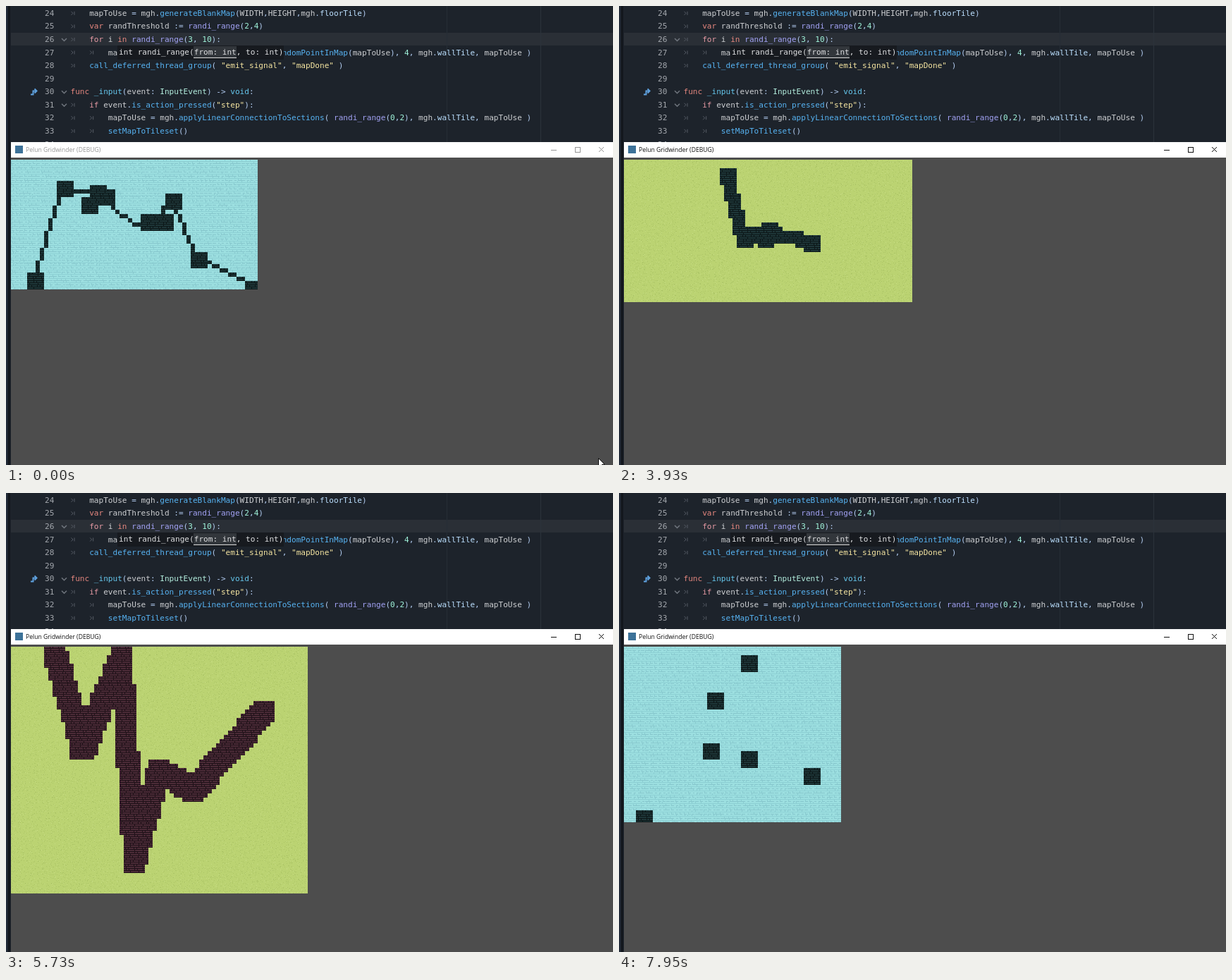
Recreate the animation shown at these times as an HTML page with a canvas. Size 861 px wide and 651 px high, loop 8000 ms.

```html
<!DOCTYPE html>
<html lang="en">
<head>
<meta charset="utf-8">
<title>Map generator</title>
<style>
html, body { margin: 0; width: 100%; height: 100%; overflow: hidden; background: #4d4d4d; }
canvas { display: block; }
</style>
</head>
<body>
<canvas id="stage" width="861" height="651"></canvas>
<script>
const ctx = document.getElementById('stage').getContext('2d');
const LOOP = 8000;
const TILE = 5.94, LEFT = 6.46, TOP = 217.98, EDGE = 7;
const CHAR = 6.67, LINE = 18.56;
const MONO = '11.08px "DejaVu Sans Mono", monospace';
const SANS = '8.6px "Open Sans", sans-serif';

function rect(color, x, y, w, h) {
  ctx.fillStyle = color;
  ctx.fillRect(x, y, w, h);
}

function stroke(color, width, ...points) {
  ctx.strokeStyle = color;
  ctx.lineWidth = width;
  ctx.beginPath();
  points.forEach(([x, y]) => ctx.lineTo(x, y));
  ctx.stroke();
}

function text(str, x, y, color, font) {
  ctx.font = font;
  ctx.fillStyle = color;
  ctx.fillText(str, x, y);
}

function noise(x, y, k) {
  const v = Math.sin(x * 12.99 + y * 78.23 + k * 37.72) * 43758.55;
  return v - Math.floor(v);
}

/* Code editor */

const CODE = `
	mapToUse = mgh.generateBlankMap(WIDTH,HEIGHT,mgh.floorTile)
	var randThreshold := randi_range(2,4)
	for i in randi_range(3, 10):
		ma                                   ndomPointInMap(mapToUse), 4, mgh.wallTile, mapToUse )
	call_deferred_thread_group( "emit_signal", "mapDone" )

func _input(event: InputEvent) -> void:
	if event.is_action_pressed("step"):
		mapToUse = mgh.applyLinearConnectionToSections( randi_range(0,2), mgh.wallTile, mapToUse )
		setMapToTileset()
`.slice(1).split('\n');

// The first rule that matches at a position colours that piece.
const SYNTAX = [
  [/"[^"]*"/y, '#f5e5a1'],
  [/\d+/y, '#a1f5dc'],
  [/(var|func|in)\b/y, '#e6877f'],
  [/(for|if)\b/y, '#e69aa4'],
  [/_input|void/y, '#66c8ee'],
  [/InputEvent/y, '#b4efdf'],
  [/randi_range/y, '#a3a3f5'],
  [/\w+(?=\()/y, '#57b3f2'],
  [/(wall|floor)Tile/y, '#bce0ff'],
  [/\w+/y, '#cdcfd2'],
  [/[^\w"]+/y, '#b3cdf2']
];

function drawCode(line, x, y) {
  for (let at = 0; at < line.length;) {
    for (const [rule, color] of SYNTAX) {
      rule.lastIndex = at;
      const hit = rule.exec(line);
      if (!hit) continue;
      text(hit[0], x + at * CHAR, y, color, MONO);
      at += hit[0].length;
      break;
    }
  }
}

function tabMark(x, y) {
  stroke('#565c66', 1, [x, y - 2.5], [x + 2.5, y], [x, y + 2.5]);
  stroke('#565c66', 1, [x + 4.5, y - 2.5], [x + 4.5, y + 2.5]);
}

function drawEditor() {
  rect('#1d232b', 0, 0, 861, 651);
  rect('#2a2f36', EDGE, 38, 854, 18);
  rect('#262d35', 625, 0, 1, 193);
  rect('#2b323a', 758, 0, 1, 193);
  rect('#222a38', 0, 0, 2, 651);
  rect('#13171d', 3, 0, 3, 651);

  CODE.forEach((line, i) => {
    const base = 13.9 + i * LINE, mid = base - 3.6;
    const code = line.trimStart(), indent = line.length - code.length;
    text(String(24 + i), 55, base, '#a4a8ae', MONO);
    if (code.endsWith(':')) stroke('#70767e', 1.5, [79, mid - 1.5], [82.5, mid + 2], [86, mid - 1.5]);
    for (let k = 0; k < indent; k++) tabMark(92.5 + k * 4 * CHAR, mid);
    drawCode(code, 91.5 + indent * 4 * CHAR, base);
  });

  // override marker beside the input handler
  stroke('#5fa2e0', 2, [35, 125.5], [38.5, 125.5], [38.5, 120.5], [42, 120.5]);
  stroke('#5fa2e0', 2, [40.5, 117.5], [43.5, 120.5], [40.5, 123.5]);

  rect('#171a1f', 158, 56, 236, 20);
  rect('#32363b', 266, 57, 61, 17);
  rect('#dcdcdc', 266, 73, 61, 1);
  text('int randi_range(from: int, to: int)', 160, 69.2, '#dfe0e2', MONO);
}

/* Game window */

function drawWindow(active) {
  const ink = active ? '#111' : '#969696';
  rect('#4d4d4d', EDGE, 215, 854, 436);
  rect('#fff', EDGE, 193, 854, 22);
  rect('#3d7299', 13, 198, 11, 11);
  text('Pelun Gridwinder (DEBUG)', 28, 207, ink, SANS);
  stroke(ink, 1, [773, 204.5], [781, 204.5]);
  ctx.strokeRect(807.5, 200.5, 7, 7);
  stroke(ink, 1, [841, 200], [848, 207]);
  stroke(ink, 1, [848, 200], [841, 207]);
}

/* Maps: rooms are 4 tiles wide unless a third item gives the size. */

const TEAL = ['#1e3638', '#0c1718'], RED = ['#4b2b37', '#1f1118'];

function randomRooms(count, cols, rows, seed) {
  return Array.from({ length: count }, (_, k) => [
    1 + Math.floor(noise(k, 1, seed) * (cols - 4)),
    1 + Math.floor(noise(k, 2, seed) * (rows - 4))
  ]);
}

const MAPS = [
  { cols: 59, rows: 31, floor: floorBrick, wall: TEAL, brush: 1, rooms: [
    [5, 28], [12, 6], [20, 7], [22, 8], [18, 10], [29, 15, 1], [32, 14], [36, 14], [38, 9], [44, 23], [57, 30]] },
  { cols: 58, rows: 39, floor: floorBrick, wall: RED, brush: 1, rooms: randomRooms(5, 58, 39, 3) },
  { cols: 69, rows: 34, floor: grass, wall: TEAL, brush: 3, rooms: [
    [24, 3], [28, 18], [33, 18], [34, 16], [44, 19]] },
  { cols: 97, rows: 70, floor: floorBrick, wall: RED, brush: 1, rooms: [
    [3, 4], [3, 59], [7, 32], [11, 35], [40, 15], [48, 34, 1], [69, 60]] },
  { cols: 71, rows: 59, floor: grass, wall: RED, brush: 5, rooms: [
    [10, 1], [15, 24], [18, 23], [26, 2], [29, 51], [35, 29], [43, 34], [60, 15]] },
  { cols: 86, rows: 38, floor: grass, wall: TEAL, brush: 5, rooms: [
    [8, 28], [12, 27], [31, 3], [42, 18]] },
  { cols: 99, rows: 21, floor: floorBrick, wall: TEAL, brush: 3, rooms: randomRooms(5, 99, 21, 8) },
  { cols: 52, rows: 42, floor: floorBrick, wall: TEAL, brush: 1, rooms: [
    [29, 3], [21, 12], [20, 24], [29, 26], [44, 30], [4, 40]] }
];

// Each press of the step key: first a new map with loose rooms, then its corridors.
const STEPS = [0, 2520, 3020, 3620, 3930, 4330, 4730, 5330, 5730, 6130, 6540, 6940, 7340, 7950];

const cellKey = (x, y) => x + ',' + y;
const snap = v => Math.ceil(v - 0.5);
const px = i => Math.max(EDGE, Math.round(LEFT + i * TILE));
const py = j => Math.round(TOP + j * TILE);

function touches(a, b) {
  return a.x <= b.x + b.size && b.x <= a.x + a.size && a.y <= b.y + b.size && b.y <= a.y + a.size;
}

// Rooms that touch form one section.
function findSections(rooms) {
  const sections = [];
  rooms.forEach(([cx, cy, size = 4]) => {
    const inset = size > 1 ? 1 : 0;
    const room = { x: cx - inset, y: cy - inset, size };
    const last = sections.at(-1);
    if (last && last.some(r => touches(r, room))) last.push(room);
    else sections.push([room]);
  });
  return sections;
}

function addBlock(cells, x, y, size, map) {
  for (let j = y; j < y + size; j++)
    for (let i = x; i < x + size; i++)
      if (i >= 0 && j >= 0 && i < map.cols && j < map.rows) cells.set(cellKey(i, j), [i, j]);
}

function findWalls(map, joined) {
  const walls = new Map();
  const centres = findSections(map.rooms).map(section => {
    const cells = new Map();
    section.forEach(r => addBlock(cells, r.x, r.y, r.size, map));
    cells.forEach((cell, key) => walls.set(key, cell));
    return [0, 1].map(axis => {
      let sum = 0;
      cells.forEach(cell => sum += cell[axis]);
      return Math.floor(sum / cells.size);
    });
  });
  if (!joined) return walls;

  const half = (map.brush - 1) / 2;
  centres.slice(1).forEach(([bx, by], n) => {
    const [ax, ay] = centres[n];
    const count = Math.max(Math.abs(bx - ax), Math.abs(by - ay));
    for (let s = 0; s <= count; s++) {
      const x = snap(ax + (bx - ax) * s / count), y = snap(ay + (by - ay) * s / count);
      addBlock(walls, x - half, y - half, map.brush, map);
    }
  });
  return walls;
}

function wallBrick(x, y, w, h, i, j, [base, line]) {
  rect(base, x, y, w, h);
  rect(line, x, y + 2, w, 1);
  rect(line, x, y + h - 1, w, 1);
  rect(line, x + (i * 2 + j) % 4, y, 1, 2);
  if ((i + j) % 2) rect(line, x + 3, y + 3, 1, 2);
}

function floorBrick(x, y, w, h, i, j, seed) {
  rect('#9cdfe0', x, y, w, h);
  const gap = Math.floor(noise(i, j, seed) * 4);
  rect('#8dd0d4', x, y + 2, w, 1);
  rect('#86c6cc', x + gap, y + h - 1, w - gap, 1);
  rect('#8accd1', x + gap, y + (gap % 2 ? 0 : 3), 1, 2);
}

function grass(x, y, w, h, i, j, seed) {
  rect('#bbd372', x, y, w, h);
  for (let k = 0; k < 4; k++) {
    const a = Math.floor(noise(i, j, seed + k) * w), b = Math.floor(noise(j, i, seed + k + 9) * h);
    rect(k < 3 ? '#acc566' : '#c6dc84', x + a, y + b, 1, 1);
  }
}

function drawMap(step) {
  const map = MAPS[Math.ceil(step / 2)];
  const walls = findWalls(map, step % 2 === 0);
  for (let j = 0; j < map.rows; j++) {
    for (let i = 0; i < map.cols; i++) {
      const x = px(i), y = py(j), w = px(i + 1) - x, h = py(j + 1) - y;
      if (walls.has(cellKey(i, j))) wallBrick(x, y, w, h, i, j, map.wall);
      else map.floor(x, y, w, h, i, j, step);
    }
  }
}

/* Pointer: time, then tip position; hidden when no position is given. */

const POINTER = [[0, 840, 641], [100, 850, 585], [200], [2010, 580, 468], [2320, 690, 570], [2420]];
const ARROW = new Path2D('M0 0V12L2.8 9.6 4.8 14 6.8 13.1 4.9 8.8 8.6 8.6Z');

function drawPointer([, x, y]) {
  if (x === undefined) return;
  ctx.save();
  ctx.translate(x + 0.5, y + 0.5);
  ctx.fillStyle = '#fff';
  ctx.fill(ARROW);
  ctx.strokeStyle = '#000';
  ctx.lineWidth = 0.9;
  ctx.stroke(ARROW);
  ctx.restore();
}

const start = performance.now();
let shown = '';

function frame() {
  const t = (performance.now() - start) % LOOP;
  const step = STEPS.findLastIndex(time => time <= t);
  const pointer = POINTER.findLastIndex(([time]) => time <= t);
  const active = t >= 2220;
  const state = [step, pointer, active].join();
  if (state !== shown) {
    shown = state;
    drawEditor();
    drawWindow(active);
    drawMap(step);
    drawPointer(POINTER[pointer]);
  }
  requestAnimationFrame(frame);
}

frame();
</script>
</body>
</html>
```
